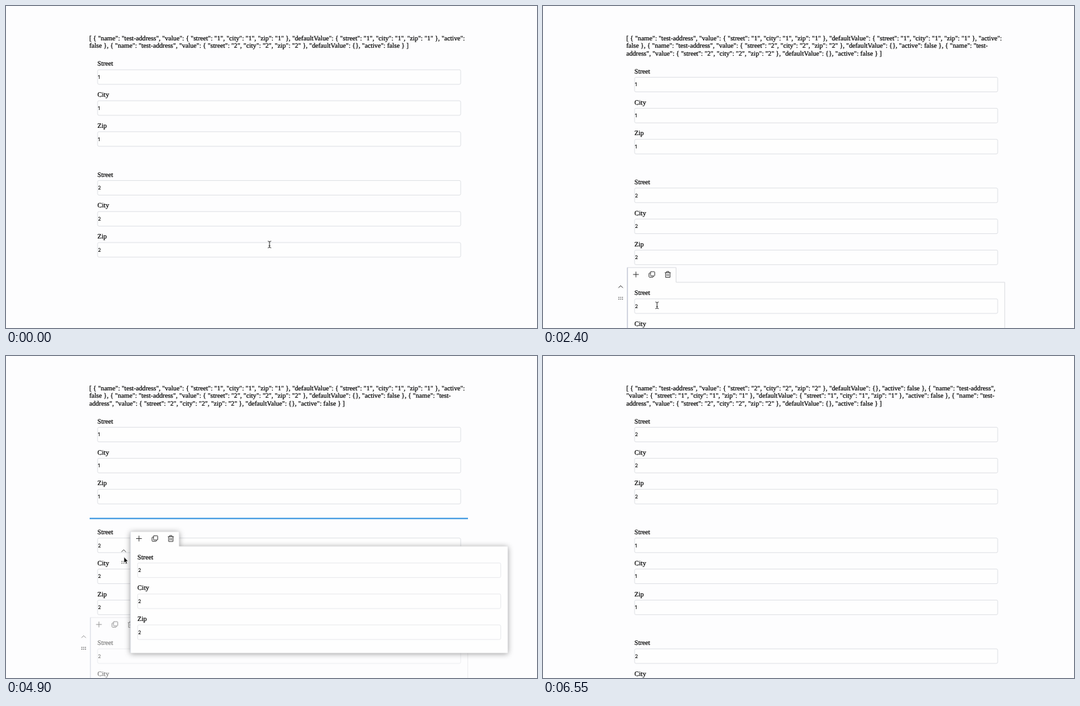
These frames come from a looping animation (800x486 px, 7400 ms). An HTML page:

```html
<!DOCTYPE html>
<html lang="en">
<head>
<meta charset="utf-8">
<title>Sortable address fields</title>
<style>
  html, body { margin: 0; width: 100%; height: 100%; overflow: hidden; background: #fdfdfe; }
  #json {
    position: absolute; left: 125.4px; top: 43.6px; width: 570.6px;
    font: 10.14px/11.55px "Liberation Serif", Times, serif; color: #000;
    -webkit-text-stroke: .22px #000; text-rendering: geometricPrecision;
  }
  svg { position: absolute; left: 0; top: 0; text-rendering: geometricPrecision; }
  .label { font: 10.14px "Liberation Serif", Times, serif; stroke: #000; stroke-width: .22; }
  .value { font: 7.6px Inter, "Liberation Sans", sans-serif; stroke: #000; stroke-width: .12; }
  .input { fill: #fefefe; stroke: #dfe1e5; }
  .panel { fill: #fefefe; }
  .edge { fill: none; stroke: #dcdde1; }
  .side { stroke: #c3c8d6; stroke-width: 1.4; }
  .icon { fill: none; stroke: #333; stroke-width: .95; }
  .ring { fill: none; stroke: #779cf3; stroke-width: 2; }
  .card .panel { filter: drop-shadow(0 1.5px 4.5px rgba(0, 0, 0, .4)); }
  .card .edge, .card .side { stroke-opacity: .4; }
  .card .input { stroke: #e8e9ec; }
  .drop { stroke: #3a96e0; stroke-width: 2; }
  .arrow { fill: #000; stroke: #fff; stroke-width: .7; }
  .hand { fill: #fff; stroke: #222; stroke-width: .9; stroke-linejoin: round; }
  .beam { fill: none; stroke: #222; stroke-width: .9; }
</style>
</head>
<body>
<div id="json"></div>
<svg id="stage" width="800" height="486" viewBox="0 0 800 486"></svg>
<script>
const LOOP = 7400, STEP = 50, PITCH = 167.2, FIELD = 46.8;
const COPY = 1350, GRAB = 4750, RELEASE = 5450, REORDER = 5500;
const FIELDS = ['Street', 'City', 'Zip'];
const START = [397, 360];

// start, end, control x, y, target x, y
const MOVES = [
  [0, 750, 250, 60, 169, 249],
  [750, 1000, 168, 240, 167, 229],
  [1700, 2450, 166, 330, 172, 455],
  [2600, 3350, 172, 400, 167, 318],
  [3550, 4300, 190, 420, 123, 450],
  [4300, 4550, 120, 445, 118.5, 441],
  [4700, 5250, 242.5, 179.5, 198, 134],
  [5600, 6350, 420, 400, 722, 140],
  [6400, 6550, 760, 100, 806, 64]
];

// time, hovered row
const HOVERS = [
  [0, -1], [50, 1], [300, 0], [700, 1], [2250, 2], [2950, 1], [4000, 2],
  [REORDER, -1], [5650, 0], [5900, 1], [6100, 0], [6300, -1]
];

const stage = document.getElementById('stage');
const json = document.getElementById('json');
const ease = u => u * u * (3 - 2 * u);

function pointer(t) {
  let [x, y] = START;
  for (const [t0, t1, cx, cy, tx, ty] of MOVES) {
    if (t <= t0) break;
    const s = ease(Math.min(1, (t - t0) / (t1 - t0))), r = 1 - s;
    x = r * r * x + 2 * r * s * cx + s * s * tx;
    y = r * r * y + 2 * r * s * cy + s * s * ty;
  }
  return [x, y];
}

const hoverAt = t => HOVERS.filter(h => h[0] <= t).pop()[1];
const valuesAt = t => t < COPY ? [1, 2] : t < REORDER ? [1, 2, 2] : [2, 1, 2];

function toJson(values) {
  const address = v => `{ "street": "${v}", "city": "${v}", "zip": "${v}" }`;
  const item = v => `{ "name": "test-address", "value": ${address(v)}, ` +
    `"defaultValue": ${v === 1 ? address(v) : '{}'}, "active": false }`;
  return `[ ${values.map(item).join(', ')} ]`;
}

const move = (x, y, body, attrs = '') => `<g transform="translate(${x} ${y})" ${attrs}>${body}</g>`;
const path = (cls, d) => `<path class="${cls}" d="${d}"/>`;

// Row parts use the middle of the first label as y = 0.
const fields = value => FIELDS.map((name, i) => move(0, i * FIELD, `
  <text class="label" x="137.8" y="3.2">${name}</text>
  <rect class="input" x="138" y="9" width="547" height="22" rx="2"/>
  <text class="value" x="138.6" y="22.8">${value}</text>`)).join('');

const frame = () =>
  path('panel', 'M127 -38.2H200.5V-16H695.7V145H127Z') +
  path('edge', 'M127 -38.2H200.5V-16H695.7V145H127') +
  path('side', 'M127.2 -38.2V145');

const tools = ring =>
  move(140, -27.8, path('icon', 'M-4.3 0H4.3M0 -4.3V4.3')) +
  move(164, -27.8, path('icon', 'M-1.8 -4.2H3.5Q4.3 -4.2 4.3 -3.4V1.4Q4.3 2.2 3.5 2.2H-1.2Q-2 2.2 -2 1.4V-3.4Q-2 -4.2 -1.2 -4.2M-2 -2.2H-3.4Q-4.3 -2.2 -4.3 -1.3V3.3Q-4.3 4.2 -3.4 4.2H1.4Q2.2 4.2 2.2 3.3V2.2')) +
  move(188, -27.8, path('icon', 'M-4.4 -2.8H4.4M-1.7 -2.8V-4.5H1.7V-2.8M-3.3 -2.8V4.4H3.3V-2.8M-1.1 -.8V2.4M1.1 -.8V2.4')) +
  (ring ? '<rect class="ring" x="153.7" y="-37.2" width="21" height="20"/>' : '');

const arrows = (up, down) =>
  (up ? path('icon', 'M113.7 -7.6L117 -10.9L120.3 -7.6') : '') +
  (down ? path('icon', 'M113.7 22.2L117 25.5L120.3 22.2') : '');

const dots = () => [0, 1, 2, 3, 4, 5].map(i =>
  `<rect x="${113.7 + i % 3 * 2.7}" y="${6.2 + (i > 2 ? 2.7 : 0)}" width="1.2" height="1.2" fill="#333"/>`).join('');

function row(value, y, { active, dim, first, last, ring }) {
  if (!active) return move(0, y, fields(value));
  const body = frame() + tools(ring) + fields(value) + arrows(!first, !last);
  return move(0, y, `<g opacity="${dim ? .5 : 1}">${body}</g>${dots()}`);
}

function cursor(x, y, overInput, overHandle) {
  if (overInput) return move(x, y, path('beam', 'M-2.5 -5Q0 -5 0 -3.6Q0 -5 2.5 -5M0 -3.8V3.8M-2.5 5Q0 5 0 3.6Q0 5 2.5 5M-1.2 1.8H1.2'));
  if (overHandle) return move(x, y, path('hand',
    'M-1.2 .4C-1.4 -1 .4 -1.2 .7 .2L1.6 3.6C2 2.7 3.3 2.9 3.4 3.8C3.9 3 5 3.3 5.1 4.2C5.8 3.6 6.6 4.1 6.5 5C6.6 7 6 8.2 5.6 9V10.8H.3V9.6C-1 8.6 -2 6.9 -3.4 5.8C-4.2 4.8 -2.8 3.9 -1.8 4.8L-.3 6Z'));
  return move(x, y, path('arrow', 'M0 0V9L2 7.2L3.5 10.5L5.1 9.8L3.6 6.6H6.3Z'));
}

function draw(t) {
  const values = valuesAt(t), hover = hoverAt(t), [x, y] = pointer(t);
  const top = t < COPY ? 87.2 : 98.6;
  const rowY = i => top + i * PITCH;
  const dragging = t >= GRAB && t < RELEASE;
  const rowAt = Math.floor((y - top + 21) / PITCH);

  // The hovered row is painted last, above its neighbours.
  const order = values.map((_, i) => i).sort((a, b) => (a === hover) - (b === hover));
  let out = order.map(i => row(values[i], rowY(i), {
    active: i === hover,
    dim: t >= GRAB && t < REORDER,
    first: i === 0,
    last: i === values.length - 1,
    ring: t >= 1000 && t < 2250
  })).join('');

  if (dragging) {
    if (rowAt < 2) out += path('drop', `M126 ${rowY(rowAt) - 20.6}H696`);
    out += move(x - 117.5, rowY(2) + y - 433,
      frame() + tools() + fields(2) + arrows(true, false) + dots(), 'class="card"');
  }

  const local = (y - top) % PITCH;
  const overInput = !dragging && x > 138 && x < 685 &&
    FIELDS.some((_, i) => Math.abs(local - 20.2 - i * FIELD) < 11.2);
  out += cursor(x, y, overInput, !dragging && x < 126.5);

  stage.innerHTML = out;
  json.textContent = toJson(values);
}

const begin = performance.now();
let shown = -1;
function tick() {
  const t = Math.floor((performance.now() - begin) % LOOP / STEP) * STEP;
  if (t !== shown) draw(shown = t);
  requestAnimationFrame(tick);
}
tick();
</script>
</body>
</html>
```
